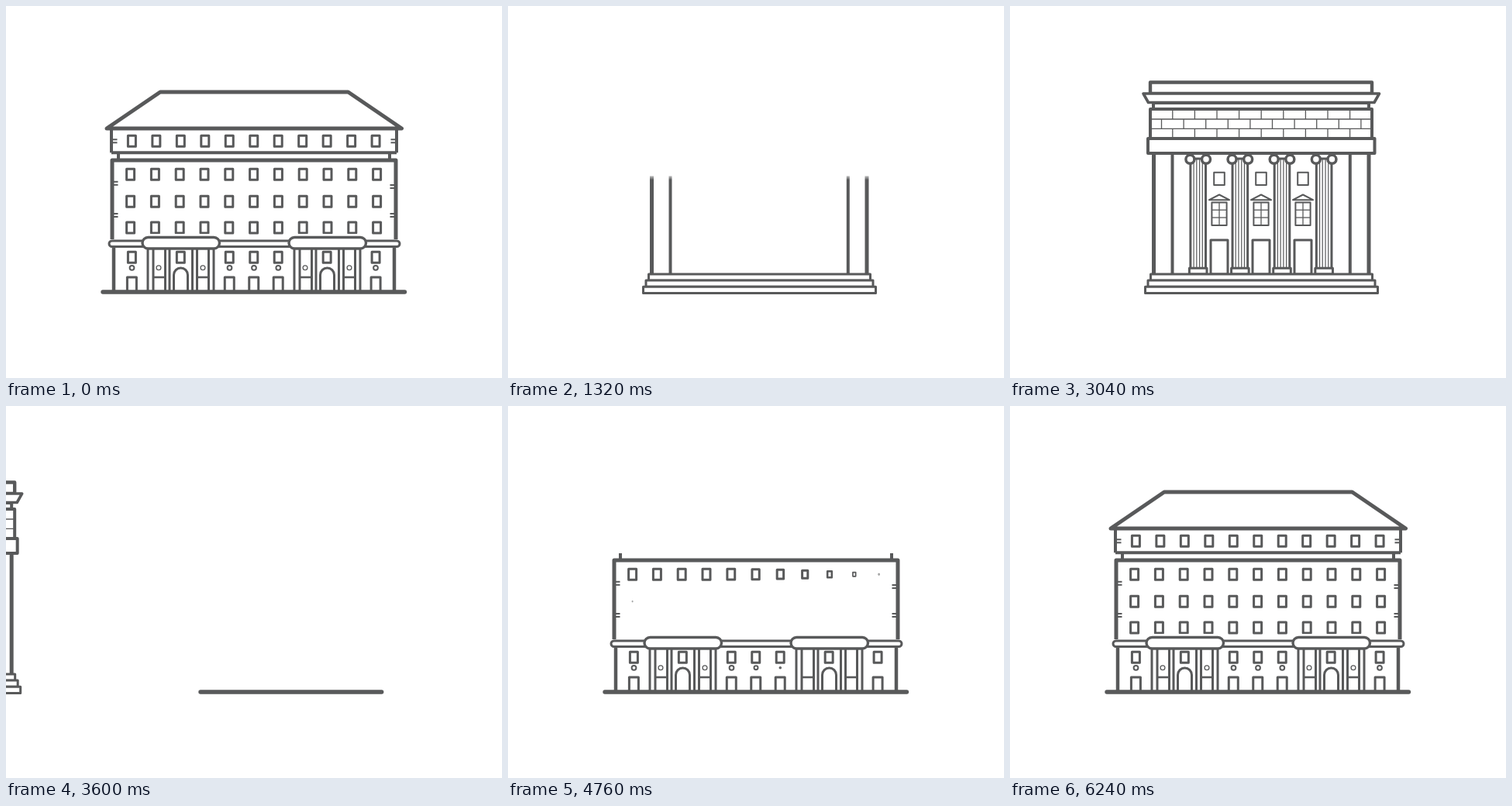
Animation, 640 px wide and 480 px high, one loop 6480 ms. Source, as an HTML page with a canvas:

```html
<!DOCTYPE html>
<html lang="en">
<head>
<meta charset="utf-8">
<title>Two buildings</title>
<style>
html, body { margin: 0; width: 100%; height: 100%; overflow: hidden; background: #fff; }
canvas { display: block; }
</style>
</head>
<body>
<canvas id="stage" width="640" height="480"></canvas>
<script>
const LOOP = 6480, INK = '#58595a', PAPER = '#fff';
const ctx = document.getElementById('stage').getContext('2d');
let now = 0;

const outQuad = u => 1 - (1 - u) ** 2;
const outCubic = u => 1 - (1 - u) ** 3;
const inOutQuad = u => u < .5 ? 2 * u * u : 1 - 2 * (1 - u) ** 2;
const linear = u => u;

// Eased progress of a step that starts at `start` and lasts `length` ms.
function at(start, length, ease = outQuad) {
  return ease(Math.min(1, Math.max(0, (now - start) / length)));
}

function ink(width, fill) {
  if (fill) { ctx.fillStyle = PAPER; ctx.fill(); }
  ctx.strokeStyle = INK;
  ctx.lineWidth = width;
  ctx.stroke();
}

function line(width, ...xy) {
  ctx.beginPath();
  for (let i = 0; i < xy.length; i += 2) ctx.lineTo(xy[i], xy[i + 1]);
  ink(width);
}

function shape(width, ...xy) {
  ctx.beginPath();
  for (let i = 0; i < xy.length; i += 2) ctx.lineTo(xy[i], xy[i + 1]);
  ctx.closePath();
  ink(width, true);
}

const box = (width, l, t, r, b) => shape(width, l, t, r, t, r, b, l, b);

function circle(width, x, y, r) {
  ctx.beginPath();
  ctx.arc(x, y, r, 0, Math.PI * 2);
  ink(width, true);
}

function pill(width, l, t, r, b) {
  ctx.beginPath();
  ctx.roundRect(l, t, r - l, b - t, (b - t) / 2);
  ink(width, true);
}

function layer(draw) {
  ctx.save();
  draw();
  ctx.restore();
}

function clip(l, t, r, b) {
  ctx.beginPath();
  ctx.rect(l, t, r - l, b - t);
  ctx.clip();
}

// Slide a part up from behind the edge at y = floor.
function rise(p, floor, height, draw) {
  if (p <= 0) return;
  layer(() => {
    if (p < 1) clip(0, 0, 640, floor + 2);
    ctx.translate(0, (1 - p) * height);
    draw();
  });
}

// Scale a part about a point.
function grow(x, y, sx, sy, draw) {
  if (sx <= 0 || sy <= 0) return;
  layer(() => {
    ctx.translate(x, y);
    ctx.scale(sx, sy);
    ctx.translate(-x, -y);
    draw();
  });
}

// Draw the leading part p of a path of the given length.
function trace(p, length, width, ...xy) {
  if (p <= 0) return;
  layer(() => {
    if (p < 1) {
      ctx.lineCap = 'butt';
      ctx.setLineDash([length * p, length * 2]);
    }
    line(width, ...xy);
  });
}

function traceBox(p, width, l, t, r, b) {
  const m = l + (r - l) * .42;
  trace(p, 2 * (r - l + b - t), width, m, t, l, t, l, b, r, b, r, t, m, t);
}

/* ---------- palace ---------- */

function pane(x, y, s) {
  if (s <= 0) return;
  const w = 5 * s, h = 7 * s;
  box(3 * Math.min(1, s * 1.5), x - w, y - h, x + w, y + h);
}

function paneRow(start, x, y, step) {
  for (let i = 0; i < 11; i++) pane(x + step * i, y, at(start + 40 * i, 300));
}

const bayX = i => 162.4 + 31.47 * i;

function ticks(x1, x2, ...ys) {
  for (const y of ys) line(2, x1, y, x2, y);
}

function portico(dx) {
  layer(() => {
    ctx.translate(dx, 0);
    const delay = dx ? 60 : 0;
    [183, 190, 205.5, 211, 240.5, 246.5, 261.5, 268].forEach((x, i) => {
      const h = 57 * at(3840 + delay + i * 20, 260);
      if (h) line(3, x, 368, x, 368 - h);
    });
    const p = at(4060 + delay, 220);
    if (p) {
      line(2.6, 190, 350, 190 + 15 * p, 350);
      line(2.6, 261.5 - 15 * p, 350, 261.5, 350);
    }
    grow(225.5, 368, 1, at(4020 + delay, 280), () => {
      ctx.beginPath();
      ctx.moveTo(216.5, 368);
      ctx.arc(225.5, 347, 9, Math.PI, 0);
      ctx.lineTo(234.5, 368);
      ink(3);
    });
  });
}

function canopy(dx) {
  const p = at(4060 + dx / 3, 300);
  grow(225.5 + dx, 306, p, p, () => {
    ctx.beginPath();
    ctx.roundRect(171 + dx, 294, 109, 12, 6);
    ctx.fillStyle = PAPER;
    ctx.fill();
  });
}

function canopyFront(dx) {
  const p = at(4060 + dx / 3, 300);
  grow(225.5 + dx, 306, p, p, () => pill(3.4, 176 + dx, 298.5, 275.5 + dx, 313));
}

function palaceGroundFloor() {
  const walls = 58 * at(3780, 300);
  if (walls) {
    line(4.5, 139, 368, 139, 368 - walls);
    line(4.5, 501, 368, 501, 368 - walls);
  }
  portico(0);
  portico(189);

  [0, 2, 4, 5, 6, 8, 10].forEach((i, n) => pane(bayX(i), 324.2, at(4140 + n * 40, 300)));
  [0, 4, 5, 6, 10].forEach((i, n) => {
    const x = bayX(i), p = at(4080 + n * 60, 280);
    if (p) line(3, x - 6, 369, x - 6, 369 - 19 * p, x + 6, 369 - 19 * p, x + 6, 369);
  });
  [162.5, 197, 254, 288.5, 320, 351.3, 386, 443, 477].forEach((x, i) => {
    const s = at(4070 + i * 126, 300);
    const thin = [1, 2, 6, 7].includes(i);
    if (s) circle((thin ? 1.3 : 2) * Math.min(1, s * 2), x, 337.8, 2.9 * s);
  });

  grow(320, 307, at(3960, 320), 1, () => pill(3, 133, 303, 508, 310.5));
  canopyFront(0);
  canopyFront(189);
}

function palaceUpperFloors() {
  const stubs = 9 * at(4580, 160);
  if (stubs) {
    line(4, 145, 199, 145, 199 - stubs);
    line(4, 495, 199, 495, 199 - stubs);
  }
  const walls = at(4180, 420);
  if (walls) {
    const top = 301 - 102 * walls;
    line(5, 137, 301, 137, top, 503, top, 503, 301);
  }
  if (now > 4640) {
    ticks(138, 144.5, 226.8, 230.8, 268, 272);
    ticks(495.5, 502, 231, 235, 268, 272);
  }
  paneRow(4339, 160.6, 217.2, 31.8);
  paneRow(4745, 160.6, 252.2, 31.8);
  paneRow(5550, 160.6, 286, 31.8);
  canopy(0);
  canopy(189);
}

function palaceAttic() {
  const sill = 184 * at(4880, 360), wall = 31 * at(5200, 360);
  if (sill) line(4, 320 - sill, 189.3, 320 + sill, 189.3);
  if (wall) {
    line(4, 136, 189.3, 136, 189.3 - wall);
    line(4, 504, 189.3, 504, 189.3 - wall);
  }
  if (now > 5520) {
    ticks(137, 143.5, 172.3, 176.3);
    ticks(496.5, 503, 172.3, 176.3);
  }
  paneRow(5550, bayX(0), 174.2, 31.47);

  const drop = at(5480, 520, outCubic);
  if (drop) layer(() => {
    ctx.translate(0, -175 * (1 - drop));
    shape(5, 130, 158, 199, 111, 441.5, 111, 510.5, 158);
  });
}

function palace() {
  ctx.lineCap = 'butt';
  palaceUpperFloors();
  palaceGroundFloor();
  palaceAttic();
  const g = at(3440, 438);
  if (g) {
    ctx.lineCap = 'round';
    line(5.4, 440 - 315 * g, 369, 440 + 74.5 * g, 369);
  }
}

/* ---------- temple ---------- */

function pillars() {
  const p = at(1103, 385);
  if (!p) return;
  const top = 346 - 156 * p;
  [[185.5, 5], [209.5, 4], [438.8, 4], [463, 5]].forEach(([x, w]) => line(w, x, 346, x, top));
  if (p < 1) {
    const fade = ctx.createLinearGradient(0, top - 3, 0, top + 5);
    fade.addColorStop(0, '#fff');
    fade.addColorStop(1, '#fff0');
    ctx.fillStyle = fade;
    ctx.fillRect(178, top - 3, 292, 8);
  }
}

function column(x, start) {
  const p = at(start, 500, outCubic);
  if (!p) return;
  const rest = 1 - p;
  layer(() => {
    ctx.translate(x, 346);
    ctx.transform(1, 0, .35 * rest, 1, 0, 0);
    const top = -149 * p;
    box(3, -9.8, top, 9.8, -7);
    for (const f of [-5.6, -1.9, 1.9, 5.6]) line(1.2, f, top, f, -7);
    box(3, -11.3, -7.7, 11.3, 0);
    const blur = Math.min(2, (rest - .045) * 90);
    if (blur > 0) ctx.filter = `blur(${blur}px)`;
    circle(3.5, -10.3, top + .8, 5.5);
    circle(3.5, 10.3, top + .8, 5.5);
  });
}

function bay(x, i) {
  const order = 2 - i;
  traceBox(at(1400 + order * 90, 300, linear), 2, x - 6.8, 214.8, x + 6.8, 231);

  const open = 1410 + order * 363;
  traceBox(at(open, 400, linear), 2, x - 9.6, 253.6, x + 9.6, 283);
  const bars = at(open + 340, 200);
  if (bars) {
    line(1.3, x, 254, x, 254 + 29 * bars);
    for (const y of [263.2, 273]) line(1.3, x - 9.6, y, x - 9.6 + 19.2 * bars, y);
  }
  grow(x, 250, at(open + 320, 220), 1, () => shape(2, x - 13, 250.2, x, 243.5, x + 13, 250.2));

  const p = at(1355 + order * 308, 320, linear);
  trace(p, 132, 3, x - 3, 302, x - 11, 302, x - 11, 346, x + 11, 346, x + 11, 302, x - 3, 302);
}

function bricks() {
  box(4, 181, 133, 467, 171);
  for (const y of [146, 158.3]) line(1.3, 182, y, 466, y);
  for (let i = 0; i < 10; i++) {
    const x = 195.5 + 28.6 * i;
    line(1.3, x, 146, x, 158.3);
    if (i < 9) {
      line(1.3, x + 14.3, 133, x + 14.3, 146);
      line(1.3, x + 14.3, 158.3, x + 14.3, 171);
    }
  }
}

function temple() {
  ctx.lineCap = 'butt';
  pillars();
  [270, 324, 378].forEach(bay);
  [1600, 1670, 1662, 1695].forEach((start, i) => column(242.7 + 54.15 * i, start));

  [[181.5, 467.5, 346], [178, 471, 354], [174.5, 474.5, 362.3]].forEach(([l, r, y], i) => {
    grow(324.5, y, at(800 - 160 * i, 360), 1, () => box(3, l, y, r, y + 8.2));
  });

  rise(at(2480, 480), 112, 16, () => box(4.4, 181, 98.5, 467, 113));
  rise(at(2060, 260), 133, 9, () => box(4, 185, 125, 463, 133));
  rise(at(2240, 360), 125, 14, () => shape(3.6, 172, 113, 476.5, 113, 470, 124.5, 178.5, 124.5));
  rise(at(1648, 580), 170, 39, bricks);
  grow(324, 180, at(1420, 300), 1, () => box(4, 178, 171, 470.5, 190));
}

/* ---------- timeline ---------- */

function slideOut(start, draw) {
  layer(() => {
    ctx.translate(-520 * at(start, 640, inOutQuad), 0);
    draw();
  });
}

function render(t) {
  now = t;
  ctx.fillStyle = PAPER;
  ctx.fillRect(0, 0, 640, 480);
  ctx.lineJoin = 'round';
  if (t < 700) slideOut(40, () => {
    now = LOOP;
    palace();
    now = t;
  });
  if (t > 440 && t < 3780) slideOut(3120, temple);
  if (t >= 3440) palace();
}

const begin = performance.now();
function tick() {
  render((performance.now() - begin) % LOOP);
  requestAnimationFrame(tick);
}
tick();
</script>
</body>
</html>
```
